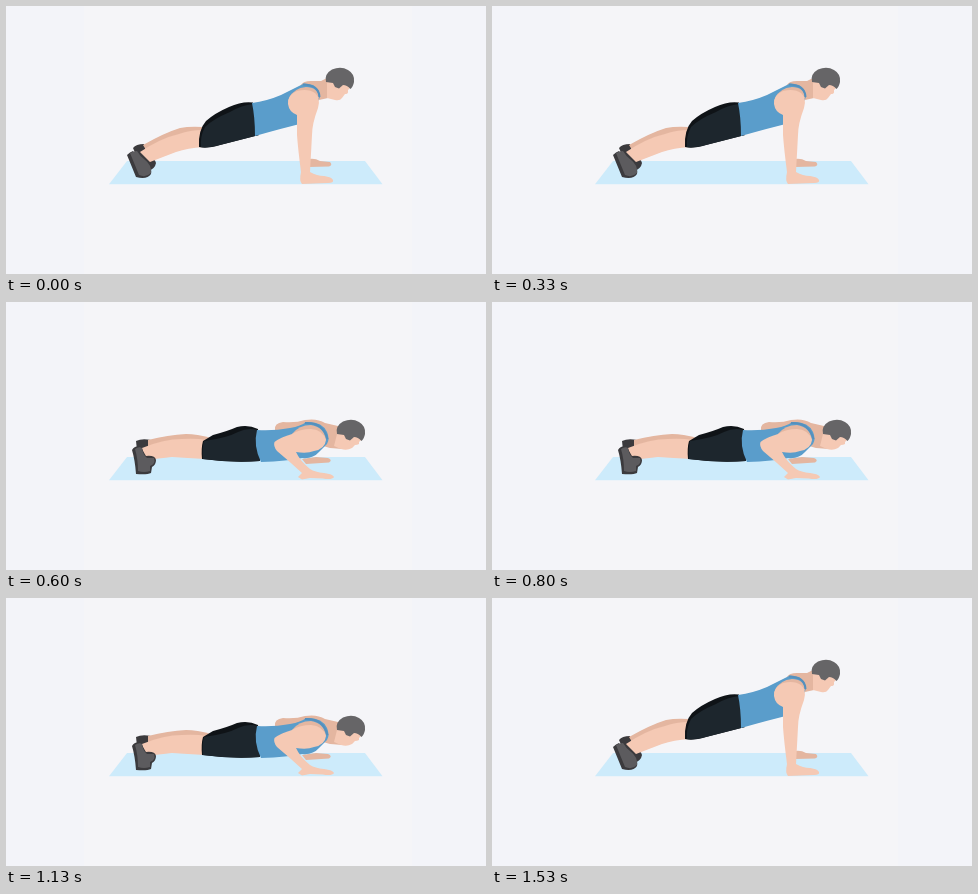
Animation of 480x268 px, one loop 1.59 s. Source, as an HTML page:

```html
<!DOCTYPE html>
<html lang="en">
<head>
<meta charset="utf-8">
<title>Push-up</title>
<style>
  html, body { margin: 0; width: 100%; height: 100%; overflow: hidden; background: #f3f4f9; }
  svg { display: block; width: 100vw; height: 100vh; }
  .skin { fill: #f5c9b4; }
  .shade { fill: #e4b6a0; }
  .hair { fill: #666567; }
  .shirt { fill: #5a9dcb; }
  .strap { fill: none; stroke: #5590bd; stroke-width: 2; }
  .shorts { fill: #0f1317; }
  .near { fill: #1d262d; }
  .shoe { fill: #5c5b5e; }
  .sole { fill: #3b3a3d; }
  .pose { animation: 1590ms step-end infinite; }
  .up { animation-name: up; }
  .down { animation-name: down; }
  /* Hard cuts: lowered from 600 ms to 1530 ms */
  @keyframes up {
    0%, 96.2264% { visibility: visible; }
    37.7358% { visibility: hidden; }
    100% { visibility: visible; }
  }
  @keyframes down {
    0%, 96.2264% { visibility: hidden; }
    37.7358% { visibility: visible; }
    100% { visibility: hidden; }
  }
</style>
</head>
<body>
<svg viewBox="0 0 480 268" preserveAspectRatio="none">
  <defs>
    <path id="hair" d="M320 76Q318 68 326 63.500Q335 60 342 64Q349 68 348 76Q347 81 344.500 83Q341 79 337 79L333 82.500L329 81L327 77Z"/>
  </defs>
  <rect x="78" width="328" height="268" fill="#f5f5f8"/>
  <path fill="#cdebfb" d="M121 155H359L376.500 178.300H103Z"/>

  <g class="pose up">
    <!-- far limbs -->
    <path class="sole" d="M127 142Q130 138 138 138L142 152Q149 152 150 157Q149 163 142 165L134 158Z"/>
    <path class="shade" d="M137 139Q158 127 174 122Q184 120 197 121L196 134L145 152Z"/>
    <path class="shade" d="M303 153Q309 152 314 155L324 156Q327 159 323 160.500L303 161Z"/>
    <!-- near leg -->
    <path class="skin" d="M134 146Q155 132 173 128Q184 124 197 124V141Q182 142 170 146L144 156Z"/>
    <path class="sole" d="M121 149Q124 146 127 145L136 158Q147 160 145 168Q141 174 130 171Z"/>
    <path class="shoe" d="M124 147Q128 145 131 145Q134 150 138 153Q146 159 145 167Q140 172 133 169Z"/>
    <path class="shorts" d="M247 96.500Q236 95 223 101Q209 107 200 115Q192 124 193 141Q201 143 214 139L253 129Z"/>
    <path class="near" d="M247 98Q236 99 224 106Q207 113 199 121Q194 130 195 141Q203 142 214 139L253 129Z"/>
    <!-- torso -->
    <path class="shade" d="M295 79Q297 75 305 75L315 75L321 72L328 84L322 92L313 94L300 86Z"/>
    <path class="shirt" d="M246 97Q261 95 275 89L298 77.500L307 79Q314 83 314 91L302 116Q277 122 249 130Q249 111 246 97Z"/>
    <path class="shade" d="M283 92Q288 82 300 81Q312 81 313 92L300 102Z"/>
    <path class="strap" d="M297 78.500Q313 79 313.500 91"/>
    <!-- near arm -->
    <path class="skin" d="M282 98Q281 89 291 85Q302 82 309 87Q315 92 312 102Q306 118 306 129L304 166Q311 170 318 170Q326 171 327 174Q328 177 322 177L296 178Q293 175 295 166Q292 143 291 129V109Q283 106 282 98Z"/>
    <!-- head -->
    <path class="skin" d="M321 77L326 68L344 77Q346 81 342 84L342 86Q342 88 339 88L336 92Q334 95 329 94L321 92Z"/>
    <use class="hair" href="#hair"/>
  </g>

  <g class="pose down">
    <!-- far limbs -->
    <path class="sole" d="M130 139Q136 136 145 138L144 152H137L131 148Z"/>
    <path class="shade" d="M142 138Q162 133 180 132Q191 132 205 136L199 146L142 150Z"/>
    <path class="shade" d="M296 157L310 155L322 156Q327 158 323 160.500L300 162Z"/>
    <!-- near leg -->
    <path class="skin" d="M136 146Q158 137 176 137Q189 136 201 138L199 157Q181 156 166 155L140 158Z"/>
    <path class="sole" d="M126 148Q128 144 134 144L140 154Q149 153 150 158Q150 163 146 165L145 171Q141 173 130 172Q129 158 126 148Z"/>
    <path class="shoe" d="M129 147Q133 144 136 146Q137 153 141 156L148 156Q150 162 144 164L144 169Q138 171 132 169Q132 157 129 147Z"/>
    <path class="shorts" d="M197 139L207 133Q222 129 231 125Q242 122 252 127L254 159Q226 161 196 157Q195 146 197 139Z"/>
    <path class="near" d="M198 139Q221 136 232 130Q242 125 252 128L254 159Q226 161 197 157Q196 146 198 139Z"/>
    <!-- torso -->
    <path class="shade" d="M269 128Q268 121 277 120Q290 121 299 118Q311 116 319 121L332 124L337 147L324 146L310 142L280 132Z"/>
    <path class="shirt" d="M251 128Q268 129 284 126Q295 124 300 120Q316 119 321 130Q324 137 321 142L313 150Q307 157 296 156Q282 159 255 160Q247 144 251 128Z"/>
    <path class="shade" d="M286 132Q293 123 305 123Q318 125 320 138L304 145Z"/>
    <path class="strap" d="M299 121Q317 120 321.500 137"/>
    <!-- near arm -->
    <path class="skin" d="M268.500 140Q275 135 286 132Q294 127 305 127Q317 128 320 138Q319 147 308 149Q301 152 290 150Q294 159 304 167Q309 170 318 171Q327 172 328 175Q326 178 317 176.500L304 176L296 177.500L292 175L296 171Q283 159 271 149Q267 144 268.500 140Z"/>
    <!-- head -->
    <path class="skin" d="M331 132L338 121L355 133Q357 137 353 140L353 142Q351 143 349 143L346 146Q341 149 335 147L328 144Z"/>
    <use class="hair" href="#hair" transform="translate(11 56)"/>
  </g>
</svg>
</body>
</html>
```
